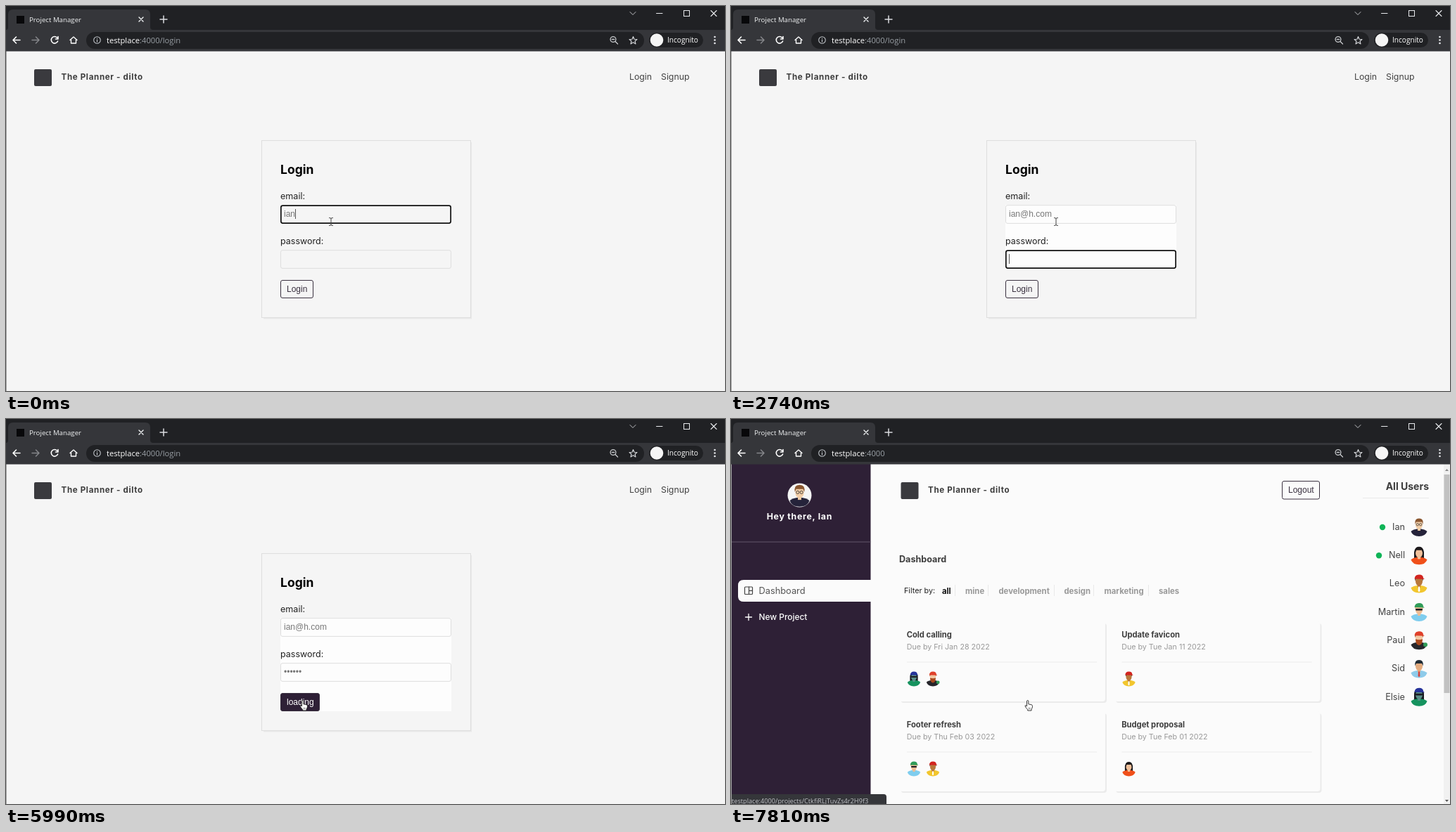
Animation, 1022 px wide and 548 px high, one loop 8000 ms. Source, as an HTML page:

```html
<!DOCTYPE html>
<html lang="en">
<head>
<meta charset="utf-8">
<title>Project Manager</title>
<style>
html, body { margin: 0; width: 100%; height: 100%; overflow: hidden; background: #f5f5f5; }
svg { display: block; width: 1022px; height: 548px; }
text { font-family: Inter, "Open Sans", sans-serif; white-space: pre; }
.ui { font-family: "Open Sans", "Noto Sans", sans-serif; }
.form { font-family: "Liberation Sans", Arial, sans-serif; }
.line { fill: none; stroke-linecap: round; stroke-linejoin: round; }
</style>
</head>
<body>
<svg id="stage" viewBox="0 0 1022 548" xmlns="http://www.w3.org/2000/svg"></svg>
<script>
const LOOP = 8000;
const PURPLE = '#2e2036';

// Shape helpers
const rect = (x, y, w, h, fill, extra = '') =>
  `<rect x="${x}" y="${y}" width="${w}" height="${h}" fill="${fill}" ${extra}/>`;
const circle = (x, y, r, fill, extra = '') =>
  `<circle cx="${x}" cy="${y}" r="${r}" fill="${fill}" ${extra}/>`;
const line = (d, color, width = 1.4, extra = '') =>
  `<path class="line" d="${d}" stroke="${color}" stroke-width="${width}" ${extra}/>`;
const shape = (d, fill, extra = '') => `<path d="${d}" fill="${fill}" ${extra}/>`;
const text = (x, y, str, size, fill, weight = 400, extra = '') =>
  `<text x="${x}" y="${y}" font-size="${size}" fill="${fill}" font-weight="${weight}" ${extra}>${str}</text>`;
const group = (id, body) => `<g id="${id}">${body}</g>`;
const at = (x, y, body, scale = 1) => `<g transform="translate(${x} ${y}) scale(${scale})">${body}</g>`;
const UI = 'class="ui"', FORM = 'class="form"', END = 'text-anchor="end"', MID = 'text-anchor="middle"';

// People: skin, shirt, hair, and optional hat, long hair, beard, shades, glasses, tie
const people = {
  Ian: { skin: '#f2cda6', shirt: '#25233a', hair: '#8a5730', glasses: true, online: true },
  Nell: { skin: '#f0c09a', shirt: '#f0501a', hair: '#1d1a1c', long: true, online: true },
  Leo: { skin: '#b9783c', shirt: '#f2c62e', hair: '#3a2414', hat: '#d3241f', tie: '#ffffff' },
  Martin: { skin: '#eebd94', shirt: '#7fcdee', hair: '#c79a50', hat: '#2f9c58', shades: true },
  Paul: { skin: '#f2c8a2', shirt: '#26262b', hair: '#a8481c', hat: '#e0402a', beard: true },
  Sid: { skin: '#e3ab7e', shirt: '#8ecbea', hair: '#1f2a33', tie: '#d8413a' },
  Elsie: { skin: '#5b8f8a', shirt: '#16935f', hair: '#17181f', hat: '#26339b', long: true, shades: true }
};

function avatar(name, x, y, scale = 1) {
  const p = people[name];
  let s = '';
  if (p.long) s += shape('M-7 6V-5Q-6-12 0-12Q6-12 7-5V6Z', p.hair);
  s += shape('M-11.5 6Q-9 3 0 2Q9 3 11.5 6Q9 13 0 13Q-9 13-11.5 6Z', p.shirt);
  s += rect(-2, 0, 4, 5, p.skin);
  s += `<ellipse cx="0" cy="-3.5" rx="5" ry="6.5" fill="${p.skin}"/>`;
  if (p.beard) s += shape('M-5-2Q0 0 5-2Q5 6 0 7Q-5 6-5-2Z', p.hair) + circle(9, 6, 3, '#2f9c58');
  s += shape('M-5.5-4Q-7-12.5 0-12.5Q7-12.5 5.5-4L4-7.5H-4Z', p.hair);
  if (p.hat) s += shape('M-6.5-7Q-6-13 0-13Q6-13 6-8L8-6.5Z', p.hat);
  if (p.tie) s += shape('M-1 4H1L1.4 10L0 12L-1.4 10Z', p.tie);
  if (p.shades) s += rect(-5, -5, 10, 2.6, '#1c1c22', 'rx="1"');
  if (p.glasses) s += circle(-2.2, -3.8, 1.7, 'none', 'stroke="#333" stroke-width=".7"') +
    circle(2.2, -3.8, 1.7, 'none', 'stroke="#333" stroke-width=".7"');
  return at(x, y, s, scale);
}

function browser() {
  const pale = '#e8eaed';
  return rect(0, 0, 1022, 35, '#202124') +
    shape('M0 34Q3 34 3 30V12Q3 5 10 5H198Q205 5 205 12V30Q205 34 209 34H1022V64.5H0Z', '#35363a') +
    rect(15, 14, 11, 11, '#08080a') +
    text(33, 23, 'Project Manager', 9.7, '#f1f3f4', 400, UI) +
    line('M189 16L195 22M195 16L189 22', '#f1f3f4') +
    line('M219 19H229M224 14V24', '#dadce0', 1.5) +
    line('M887 8.5L891 12.5L895 8.5', '#c0c1c4', 1) +
    line('M924.5 10.5H933', pale, 1) +
    rect(963.5, 6.5, 8, 8, 'none', `stroke="${pale}"`) +
    line('M1002 6.5L1010 14.5M1010 6.5L1002 14.5', pale, 1.1) +
    line('M20 48.5H10M14.5 44L10 48.5L14.5 53', '#fff', 1.6) +
    line('M37 48.5H47M42.5 44L47 48.5L42.5 53', '#85868a', 1.5) +
    line('M73 45.5A4.8 4.8 0 1 0 73.6 50M74 43.5V47H70.5', '#fff', 1.6) +
    line('M91 48.5L96 44L101 48.5M92.5 48V53H99.5V48', '#fff', 1.4) +
    rect(114, 37, 793, 24, '#202124', 'rx="12"') +
    circle(129.5, 48.5, 4.8, 'none', 'stroke="#bdc1c6" stroke-width="1.1"') +
    line('M129.5 48V51M129.5 46V46.2', '#bdc1c6', 1.2) +
    `<text class="ui" x="143" y="53" font-size="11.2" fill="#fff">testplace<tspan id="path" fill="#9aa0a6"></tspan></text>` +
    circle(863, 47.5, 3.9, 'none', 'stroke="#c8cacd" stroke-width="1.3"') +
    line('M866 50.5L869.5 54M861.3 47.5H864.7', '#c8cacd', 1.3) +
    line('M891.5 43.5L893 47.2L897 47.5L894 50L895 54L891.5 51.8L888 54L889 50L886 47.5L890 47.2Z', '#d4d6d9', 1.1) +
    rect(914, 38, 77, 21, '#202124', 'rx="10.5"') +
    circle(925, 48.5, 9.3, '#f5f5f5') +
    text(940, 52.3, 'Incognito', 10.1, '#fff', 400, UI) +
    [44, 48.5, 53].map(y => circle(1007.5, y, 1.3, pale)).join('');
}

const brand = x => rect(x, 90, 25, 24, '#3a3a3e', 'rx="2"') +
  text(x + 38.5, 105, 'The Planner - dilto', 11.6, '#3d3d3d', 700, 'letter-spacing=".65"');

const field = id => `<rect id="${id}" rx="2.5" fill="none"/>`;

function loginView() {
  return brand(40) +
    text(886, 105, 'Login', 12.3, '#444') + text(931, 105, 'Signup', 12.3, '#444') +
    rect(366, 194, 296, 251.5, '#e9e9e9') +
    rect(363.5, 191.5, 297, 252, '#f5f5f5', 'stroke="#dedede"') +
    rect(390, 283, 243, 91, '#fdfdfd', 'id="glow"') +
    text(390, 238.5, 'Login', 17.5, '#000', 700) +
    text(390, 275, 'email:', 12.6, '#222') + text(390, 339, 'password:', 12.5, '#222') +
    field('mailBox') + field('passBox') +
    text(395, 300, '', 12, '#777', 400, 'class="form" id="mail"') +
    text(395, 364, '', 12, '#777', 400, 'class="form" id="pass"') +
    rect(395, 289, 1, 14, '#555', 'id="caret"') +
    '<rect id="button" x="390.5" y="390.5" height="25" rx="2.5" stroke="#3a3140"/>' +
    text(399, 407, '', 12, '#333', 400, 'class="form" id="buttonText"');
}

function sidebar() {
  return rect(1, 64, 197.5, 484, PURPLE) +
    circle(97.5, 108.5, 17, '#f5f5f5') + group('myFace', avatar('Ian', 97.5, 109, 1.22)) +
    text(97.4, 143, 'Hey there, Ian', 12.3, '#fff', 700, `${MID} letter-spacing=".75"`) +
    rect(1, 174.5, 197.5, 1, '#62566a') +
    shape('M199 229H18Q10 229 10 237V252Q10 260 18 260H199Z', '#f5f5f5', 'id="tab"') +
    rect(19.5, 239, 11, 10.5, 'none', 'stroke="#444" stroke-width="1.2" rx="1"') +
    line('M25.5 239V249.5M25.5 244.3H30.5', '#444', 1.2) +
    text(39.5, 248.6, 'Dashboard', 12.8, '#555') +
    line('M20.5 282H29.5M25 277.5V286.5', '#fff', 1.3) +
    text(39.5, 286.3, 'New Project', 11.9, '#fff', 500);
}

const names = Object.keys(people);
const rowY = i => 154 + i * 40.3;

function rightSide() {
  const rows = names.map((n, i) =>
    text(972, rowY(i) + 3.7, n, 12.7, '#444', 400, END) +
    (people[n].online ? circle(i ? 935 : 940, rowY(i), 4.2, '#0fb457') : '')).join('');
  return rect(797.5, 88.5, 53, 25.5, 'none', 'rx="2.5" stroke="#3a3140"') +
    text(806, 105, 'Logout', 12, '#3a3140', 400, FORM) +
    text(1006, 100.7, 'All Users', 14, '#3d3d3d', 700, END) +
    rect(912, 112, 94, 1, '#e9e9e9') + group('names', rows);
}

const cards = [
  ['Cold calling', 'Fri Jan 28 2022', ['Elsie', 'Paul']],
  ['Update favicon', 'Tue Jan 11 2022', ['Leo']],
  ['Footer refresh', 'Thu Feb 03 2022', ['Martin', 'Leo']],
  ['Budget proposal', 'Tue Feb 01 2022', ['Nell']]
].map(([title, due, team], i) => ({ title, due, team, x: 239 + (i % 2) * 305.5, y: 290 + (i >> 1) * 128 }));

function board() {
  const tags = [[300, 'all'], [333, 'mine'], [380.5, 'development'], [473.5, 'design'], [530.5, 'marketing'], [608, 'sales']];
  return text(246, 248, 'Filter by:', 10.8, '#222') +
    tags.map(([x, s], i) => text(x, 248.5, s, 11.3, i ? '#999' : '#111', 700)).join('') +
    [318, 365, 459, 515, 593].map(x => rect(x, 236, 1, 16, '#e9e9e9')).join('') +
    cards.map(c =>
      rect(c.x + 2.5, c.y + 1, 292.5, 113, '#ebebeb', 'rx="4"') +
      rect(c.x, c.y - 2, 293, 114, '#fbfbfb', 'rx="4"') +
      text(c.x + 10.7, c.y + 20.7, c.title, 11.2, '#3d3d3d', 700) +
      text(c.x + 10.7, c.y + 37.5, 'Due by ' + c.due, 10.7, '#999') +
      rect(c.x + 11, c.y + 55.5, 270, 1, '#ececec')).join('') +
    rect(1013, 64, 9, 484, '#f1f1f1') + rect(1013.5, 79, 8, 311, '#c1c1c1') +
    shape('M1015 74L1017.5 71L1020 74Z', '#888') + shape('M1015 542L1017.5 545L1020 542Z', '#555') +
    avatar('Ian', 978, 154);
}

const lateFaces = () =>
  names.slice(1).map((n, i) => avatar(n, 978, rowY(i + 1))).join('') +
  cards.map(c => c.team.map((n, i) => avatar(n, c.x + 21 + i * 27, c.y + 80, .8)).join('')).join('');

const status = () =>
  shape('M0 534H217Q221 534 221 538V548H0Z', '#35363a') +
  text(1, 546.5, 'testplace:4000/projects/CtkfiRLjTuvZs4r2H9f3', 9.2, '#c3c5c9', 400, UI);

const pointers = {
  beam: line('M-2.5-5.5Q-.5-5.5 0-4.5Q.5-5.5 2.5-5.5M0-4.5V4.5M-2.5 5.5Q-.5 5.5 0 4.5Q.5 5.5 2.5 5.5', '#444', 1),
  arrow: shape('M.3.5V11.3L2.8 9L4.8 13.3L6.7 12.4L4.8 8.3H8.3Z', '#fff', 'stroke="#222" stroke-width=".9"'),
  hand: shape('M3 9V1.8Q3 .5 4.2.5Q5.3.5 5.3 1.8V5.8L9.3 6.6Q11 7 11 8.6Q11 11.5 9.5 13V15H4.2V13.5Q2 11.5.7 9Q.3 7.5 1.5 7.5Z', '#fff', 'stroke="#222" stroke-width=".9"') +
    line('M6 11V13M7.6 11V13', '#444', .6)
};

document.getElementById('stage').innerHTML =
  rect(0, 64, 1022, 484, '#f5f5f5', 'id="page"') +
  group('login', loginView()) +
  group('home', sidebar() + brand(241.5) + text(239, 204, 'Dashboard', 12.6, '#3d3d3d', 700) +
    group('right', rightSide()) + group('board', board()) + group('lateFaces', lateFaces()) +
    group('status', status())) +
  rect(0, 64, 1, 484, '#a3a3a3') + browser() +
  Object.keys(pointers).map(k => group(k, pointers[k])).join('');

const el = Object.fromEntries([...document.querySelectorAll('[id]')].map(e => [e.id, e]));

// Timelines: [start in ms, value...]
const mailSteps = [[0, 3], [590, 4], [1030, 5], [1480, 6], [1610, 7], [1730, 8], [2000, 9]];
const passSteps = [[0, 0], [3600, 1], [3750, 2], [4020, 3], [4300, 5], [4580, 6]];
const caretSteps = [[0, 'mail'], [310, ''], [590, 'mail'], [2620, ''], [2740, 'pass'], [3330, ''],
  [3600, 'pass'], [5170, ''], [5710, 'pass'], [5990, '']];
const focusSteps = [[0, 'mail'], [2740, 'pass'], [5990, '']];
const pointerSteps = [[0, 'beam', 462, 307], [5170, 'arrow', 456.5, 326.5], [5290, 'beam', 448, 359],
  [5430, 'arrow', 437.5, 374.5], [5580, 'hand', 417.5, 400], [6950, 'arrow', 421, 401], [7370, 'hand', 417.5, 400]];

const pick = (steps, t) => steps.filter(s => s[0] <= t).pop();
const show = (e, on) => e.setAttribute('visibility', on ? 'inherit' : 'hidden');
const set = (e, attrs) => { for (const k in attrs) e.setAttribute(k, attrs[k]); };

// Keeps the border inside the field whatever its weight
function border(e, top, focused) {
  const w = focused ? 1.7 : 1;
  set(e, {
    x: 390 + w / 2, y: top + w / 2, width: 243 - w, height: 26.7 - w,
    stroke: focused ? '#111' : '#dedede', 'stroke-width': w
  });
}

function drawLogin(t) {
  el.mail.textContent = 'ian@h.com'.slice(0, pick(mailSteps, t)[1]);
  el.pass.textContent = '•'.repeat(pick(passSteps, t)[1]);
  const focus = pick(focusSteps, t)[1];
  border(el.mailBox, 283.2, focus === 'mail');
  border(el.passBox, 347.2, focus === 'pass');
  show(el.glow, t >= 2740);
  set(el.glow, { height: t >= 5990 ? 133 : 91 });

  const owner = pick(caretSteps, t)[1];
  show(el.caret, owner);
  if (owner) {
    const len = el[owner].textContent ? el[owner].getComputedTextLength() : 0;
    set(el.caret, { x: Math.floor(395 + len), y: owner === 'mail' ? 289 : 353 });
  }

  const hover = t >= 5580, loading = t >= 5990;
  set(el.button, { width: loading ? 55 : 46, fill: hover ? PURPLE : '#f5f5f5' });
  set(el.buttonText, { fill: hover ? '#fff' : '#3a3140' });
  el.buttonText.textContent = loading ? 'loading' : 'Login';
}

function drawHome(t) {
  const loaded = t >= 7520;
  const bg = loaded ? '#fbfbfb' : '#f5f5f5';
  set(el.page, { fill: bg });
  set(el.tab, { fill: bg });
  set(el.right, { transform: `translate(${loaded ? -14 : 0} 0)` });
  show(el.names, t >= 7370);
  show(el.board, loaded);
  show(el.myFace, loaded);
  show(el.lateFaces, t >= 7810);
  show(el.status, loaded);
  set(el.status, { opacity: t >= 7660 ? 1 : .4 });
}

function draw(now) {
  const t = now % LOOP;
  const home = t >= 6950;
  el.login.style.display = home ? 'none' : '';
  el.home.style.display = home ? '' : 'none';
  el.path.textContent = home ? ':4000' : ':4000/login';
  if (!home) drawLogin(t);
  drawHome(t);

  const [, kind, x, y] = pick(pointerSteps, t);
  for (const k in pointers) show(el[k], k === kind);
  set(el[kind], { transform: `translate(${x} ${y})` });
}

const start = performance.now();
function tick() {
  draw(performance.now() - start);
  requestAnimationFrame(tick);
}
tick();
</script>
</body>
</html>
```
